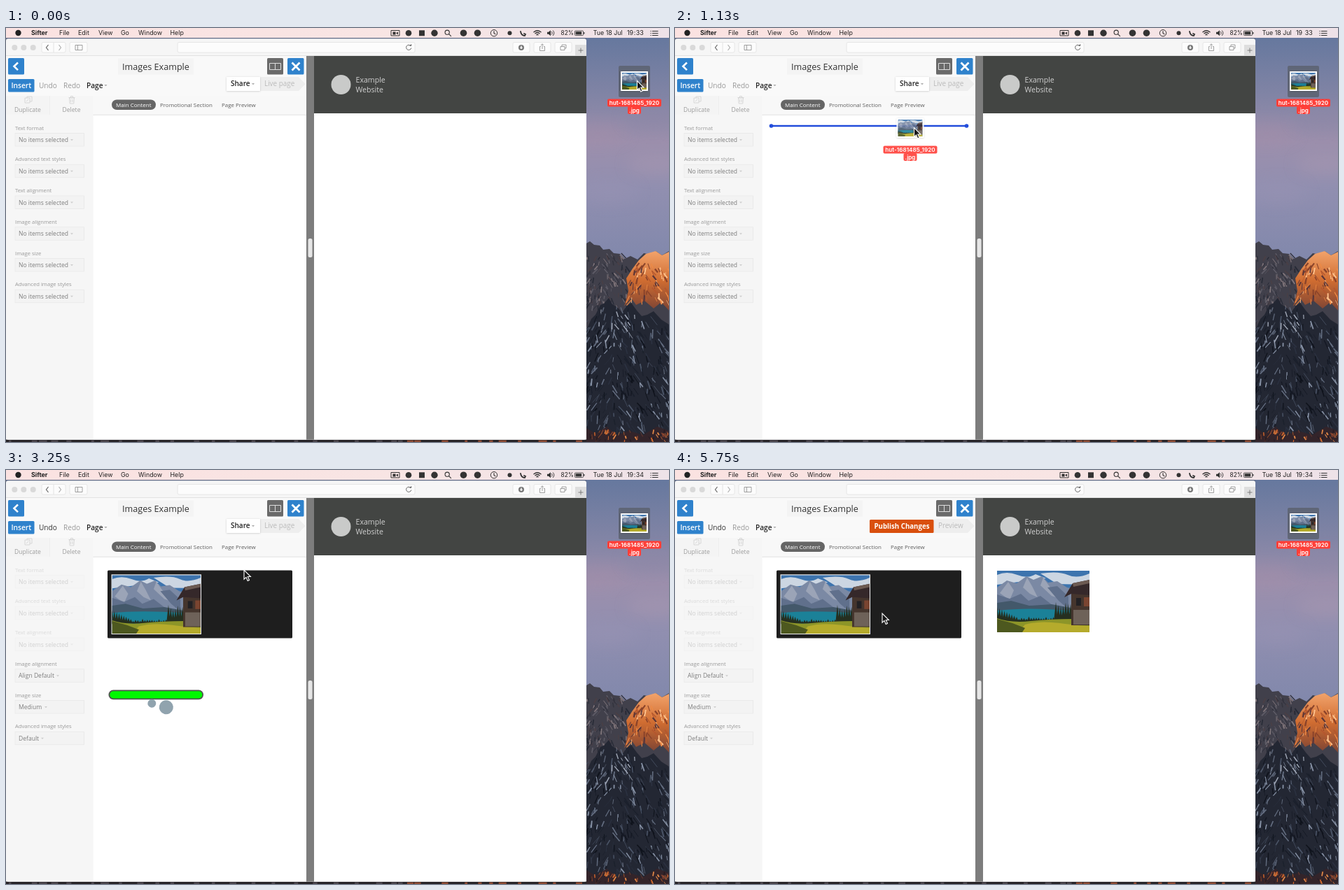
Animation, 947 px wide and 592 px high, one loop 7 s. Source, as an HTML page:

```html
<!DOCTYPE html>
<html lang="en">
<head>
<meta charset="utf-8">
<title>Drag an image into a page</title>
<style>
html, body { margin: 0; width: 100%; height: 100%; overflow: hidden; background: #fff; }
svg { display: block; width: 100vw; height: 100vh; }
text { font-family: "Open Sans", sans-serif; white-space: pre; }
.sys { font-family: Inter, sans-serif; }
</style>
</head>
<body>
<svg id="stage" viewBox="0 0 947 592" preserveAspectRatio="none"></svg>
<script>
let seed = 11;
const rnd = (a, b) => a + (b - a) * ((seed = seed * 16807 % 2147483647) / 2147483647);
const rect = (x, y, w, h, fill, more = '') =>
  `<rect x="${x}" y="${y}" width="${w}" height="${h}" fill="${fill}" ${more}/>`;
const dot = (x, y, r, fill, more = '') => `<circle cx="${x}" cy="${y}" r="${r}" fill="${fill}" ${more}/>`;
const path = (d, fill, more = '') => `<path d="${d}" fill="${fill}" ${more}/>`;
const line = (d, color, w = 1, more = '') => path(d, 'none', `stroke="${color}" stroke-width="${w}" ${more}`);
const text = (x, y, s, size, fill, more = '') =>
  `<text x="${x}" y="${y}" font-size="${size}" fill="${fill}" ${more}>${s}</text>`;
const sys = (x, y, s, more = '', size = 8.9) => text(x, y, s, size, '#222', 'class="sys" ' + more);
const group = (id, body, more = '') => `<g id="${id}" ${more}>${body}</g>`;
const caret = (x, y, color = '#aaa') => path(`M${x - 2} ${y - 1}h4l-2 2.2z`, color);
const mid = 'text-anchor="middle"', semi = 'font-weight="600"', bold = 'font-weight="700"';

function defs() {
  let trees = '';
  for (let x = 0; x < 106; x += 3.5) {
    const h = x < 30 ? 21 - x / 2 : x > 82 ? rnd(20, 30) : rnd(4, 8), y = 73;
    trees += `M${x - 3} ${y}L${x} ${(y - h).toFixed(1)}L${x + 3} ${y}z`;
  }
  const photo = rect(0, 0, 132, 88, '#3d74ae') +
    path('M0 6Q14 0 29 6T55 5L70 11 0 20zM62 4Q88 0 101 6T132 4V20L86 19z', '#ccd6e2') +
    path('M0 24L14 14 28 18 42 8 52 13 64 8 73 17 86 15 100 24 132 30V64H0z', '#7b89a4') +
    path('M4 32L16 16 24 28 18 42zM37 24L43 10 50 22 58 38 47 33zM62 21L66 10 76 24 90 40 78 36z', '#9ba4b7') +
    path('M0 34L18 40 34 33 45 43 62 36 84 53H0zM72 24L86 22 102 37V55L88 43z', '#60708c') +
    path('M0 46L20 43 46 50 78 48 105 53V74H0z', '#43586a') +
    path('M0 57Q44 52 104 57V74H20L0 68z', '#1b8198') +
    path(trees, '#252f20') +
    path('M0 68Q20 75 48 72T108 69L132 76V88H0z', '#8d9528') +
    path('M40 77Q60 71 90 75T132 79V88H30z', '#b5ab2c') +
    path('M0 69L22 75 40 82 36 88H0z', '#4d581f') +
    rect(106, 30, 26, 48, '#45352d') + rect(109, 56, 23, 21, '#6e6259') +
    rect(113, 39, 7, 11, '#222124') + rect(124, 38, 8, 13, '#7a4430') +
    path('M96 38L108 18 132 13V35L106 33z', '#35282a') + path('M108 18L132 13V18L109 23z', '#6c5a52');
  const label = rect(-38.5, 25.5, 77, 11, '#ff3f38', 'rx="2"') + rect(-9.5, 36, 19, 11, '#ff3f38', 'rx="2"') +
    text(0, 34.1, 'hut-1681485_1920', 8.15, '#fff', `class="sys" ${mid} ${semi}`) +
    text(0, 44.6, '.jpg', 8.15, '#fff', `class="sys" ${mid} ${semi}`);
  return `<defs>
    <linearGradient id="sky" x2="0" y2="1"><stop stop-color="#66789e"/><stop offset=".25" stop-color="#8184a5"/>
      <stop offset=".45" stop-color="#9c8fac"/><stop offset=".65" stop-color="#918fb0"/><stop offset="1" stop-color="#7f87ab"/></linearGradient>
    <linearGradient id="menu"><stop stop-color="#fbe2e1"/><stop offset=".6" stop-color="#f8e5e4"/><stop offset="1" stop-color="#eee2e8"/></linearGradient>
    <linearGradient id="lit" x2="0" y2="1"><stop stop-color="#f2a36b"/><stop offset=".5" stop-color="#cf6c31"/><stop offset="1" stop-color="#7d4434"/></linearGradient>
    <filter id="soft" x="-60%" y="-90%" width="220%" height="280%"><feGaussianBlur stdDeviation="10"/></filter>
    <filter id="shade" x="-20%" y="-20%" width="140%" height="150%"><feDropShadow dx="0" dy=".5" stdDeviation=".9" flood-opacity=".2"/></filter>
    <clipPath id="desk"><rect x="829" y="14" width="118" height="578"/></clipPath>
    <clipPath id="frame"><rect width="132" height="88"/></clipPath>
    ${group('photo', photo, 'clip-path="url(#frame)"')}
    ${group('file', rect(-19.5, -14, 39, 28, '#fff', 'filter="url(#shade)"') +
      '<use href="#photo" transform="translate(-17.5 -12) scale(.265 .273)"/>' + label)}
    ${group('badge', dot(9, 20.5, 8.6, '#2eb83b') + line('M9 15.5v10M4 20.5h10', '#fff', 2))}
    ${group('arrow', path('M0 0V13.2L3 10.4 5.2 15.5 7.5 14.5 5.3 9.5H9.4z', '#161616', 'stroke="#fff" stroke-width="1.1"'))}
  </defs>`;
}

function wallpaper() {
  let s = rect(829, 14, 118, 330, 'url(#sky)');
  for (const [x, y, c] of [[845, 150, '#a38da8'], [930, 195, '#a797b0'], [860, 235, '#9893b3'], [925, 130, '#8d87a6']])
    s += `<ellipse cx="${x}" cy="${y}" rx="42" ry="14" fill="${c}" opacity=".5" filter="url(#soft)"/>`;

  // short strokes that run down both sides of a ridge
  const scratch = (n, [x0, x1, y0, y1], ridge, colors, size, wide = 1.6) => {
    for (let i = 0; i < n; i++) {
      const x = rnd(x0, x1), y = rnd(y0, y1), h = rnd(.4, 1) * size, lean = (x < ridge ? -1 : 1) * rnd(-.2, 1) * h;
      s += line(`M${x.toFixed(1)} ${y.toFixed(1)}l${lean.toFixed(1)} ${h.toFixed(1)}`, colors[i % colors.length], rnd(.6, wide).toFixed(1));
    }
  };
  s += path('M829 308L834 305 840 310 848 311 853 317 862 316 868 322 877 323 884 330 892 326 902 331 911 322 921 324 928 319 937 325 947 319V592H829z', '#41404b');
  scratch(150, [829, 886, 322, 400], 850, ['#272a36', '#5c5a65', '#34343f', '#80757a', '#4a3f45'], 9, 2.2);
  s += path('M883 398L889 376 886 358 895 344 904 332 914 323 928 319 937 325 947 320V404L936 392 925 401 912 390 900 396 893 386z', 'url(#lit)');
  scratch(75, [890, 946, 334, 390], 914, ['#ffc08a', '#8a432a', '#ee8a45', '#56353a', '#b4572e'], 11, 2.4);
  s += path('M829 432L836 416 842 410 849 396 854 394 861 386 866 395 874 400 880 407 886 398 893 393 901 404 908 412 916 410 925 405 936 417 947 424V592H829z', '#232733');
  scratch(330, [829, 946, 412, 572], 866, ['#151924', '#4b5568', '#1b202c', '#8994a8', '#2b3140', '#0f131c', '#636d80'], 13, 1.9);
  scratch(40, [846, 900, 398, 440], 866, ['#a2a9b8', '#1b202c', '#5d6678'], 10);
  s += path('M829 572L842 580 858 570 873 582 890 576 910 582 930 570 947 576V592H829z', '#33242a');
  scratch(50, [832, 946, 574, 590], 880, ['#c8632c', '#241a20', '#8c4730', '#e58a48'], 7, 2);
  // a sliver of the desktop shows round the window
  let below = rect(0, 14, 829, 6, '#5f6a86') + rect(0, 584, 829, 8, '#262327');
  for (let x = 4; x < 829; x += rnd(9, 40))
    below += rect(x.toFixed(1), 589.5, rnd(3, 12).toFixed(1), 2.5, x > 560 ? '#8c4a33' : '#4a454c');
  return below + `<g clip-path="url(#desk)">${s}</g>`;
}

function menuBar() {
  let s = rect(0, 0, 947, 14, 'url(#menu)') + dot(17.5, 7, 4.2, '#222');
  [[36, 'Sifter', bold], [76, 'File'], [103, 'Edit'], [132, 'View'], [164, 'Go'], [189, 'Window'], [234.5, 'Help']]
    .forEach(([x, name, w]) => s += sys(x, 10.3, name, w));
  const ink = '#333', thin = (d, w = 1.1) => line(d, ink, w, 'stroke-linecap="round"');
  s += line('M550 3.5h12v7.5h-12z', ink) + path('M552.5 5.5h4v4h-4zM557 7.2l3-1.8v4.2z', ink);
  s += dot(575, 7.3, 4.3, ink) + rect(590, 3.3, 8, 8, ink) + dot(612, 7.2, 4.7, ink) + dot(653.5, 7.2, 4.8, ink) +
    dot(673.5, 7.2, 4.8, ink) + dot(719.5, 7.2, 3, ink);
  s += dot(630.2, 6.2, 3.1, 'none', `stroke="${ink}" stroke-width="1.1"`) + thin('M632.6 8.6l3 3');
  s += dot(697, 7.2, 4.7, 'none', `stroke="${ink}"`) + thin('M697 4.5v3l2 1.2');
  s += thin('M735 5q1 6 6 6l1-2-2-1', 1.8);
  s += thin('M754 5.7q5-4 10 0M756 7.8q3-2.5 6 0M758 9.8q1-1 2 0', 1.4);
  s += path('M773 5.8h2l3-2.5v8l-3-2.5h-2z', ink) + thin('M779.5 5.2q2 2 0 4M781.5 3.8q3 3.3 0 6.8', .9);
  s += sys(792.5, 10.2, '82%', '', 8.4) + rect(812.5, 4, 12, 6.6, 'none', `stroke="${ink}" stroke-width=".8" rx="1"`) +
    rect(813.7, 5.2, 8.5, 4.2, ink) + rect(825.2, 6, 1.2, 2.6, ink);
  s += sys(838.7, 10.3, 'Tue 18 Jul') + sys(887, 10.3, '19') + sys(896.8, 9.9, ':', 'id="colon"') + sys(899.8, 10.3, '33', 'id="minute"');
  for (let i = 0; i < 3; i++) s += rect(920.5, 4 + i * 3, 1.2, 1, ink) + rect(923, 4 + i * 3, 8.5, 1, ink);
  return s;
}

function browser() {
  let s = rect(0, 15.3, 829, 573.4, '#f6f6f6', 'rx="3"') + rect(0, 39.4, 829, .6, '#d5d5d5');
  [12.3, 25.3, 38.7].forEach(x => s += dot(x, 28, 4, '#d9d9d9'));
  const box = (x, w) => rect(x, 20.5, w, 14.5, '#fcfcfc', 'stroke="#e2e2e2" stroke-width=".8" rx="2"');
  s += box(51, 34) + box(91, 25) + box(245, 339) + box(724, 24) + box(754, 24) + box(784, 24) + line('M68 21v14', '#dedede', .8);
  s += line('M60.5 24l-3 4 3 4', '#666', 1.2) + line('M75.5 24l3 4-3 4', '#aaa', 1.1);
  s += line('M99 24.5h10v7h-10zM102.5 24.5v7', '#888', .8);
  s += line('M578 25.5a3.6 3.6 0 1 0 .8 3', '#666', 1) + path('M576 25.8h3.2v-3z', '#666');
  s += dot(736, 28, 4, '#777') + path('M735.3 25.5h1.4v2.3h1.6l-2.3 2.4-2.3-2.4h1.6z', '#fff');
  s += line('M764 26.5h-1.5v6h7v-6h-1.5M766 30v-7M764 24.7l2-2 2 2', '#888', .8);
  s += line('M792 26.5h6v5h-6zM794 26v-2h6v5h-2', '#888', .8);
  s += rect(813, 24, 16, 16, '#dedede') + line('M821 28.5v7M817.5 32h7', '#666', .8);
  // right-hand page
  s += rect(440, 40, 389, 548.5, '#fff') + rect(440, 40, 389, 82, '#434543');
  s += dot(478.5, 81, 14, '#c9cac9') + text(499.5, 78, 'Example', 10.6, '#d0d0d0') + text(499.5, 92.2, 'Website', 10.6, '#d0d0d0');
  s += group('result', '<use href="#photo" transform="translate(460 144)"/>');
  return s;
}

function sidebar() {
  const names = ['Text format', 'Advanced text styles', 'Text alignment', 'Image alignment', 'Image size', 'Advanced image styles'];
  const picked = [, , , ['Align Default', 74], ['Medium', 57], ['Default', 52]];
  const select = (y, s, x) => text(18, y + 163, s, 8.55, '#7d7d7d') + caret(x, y + 160, '#cdcdcd');
  let s = rect(0, 97, 124.5, 491.5, '#f6f6f6') + rect(0, 97, 62, 27, '#f4f4f4') + line('M62.5 97v27', '#eee');
  s += line('M27 100h7v7h-7zM30 100v-2h7v7h-3M29 105l3-3', '#d4d4d4', .9);
  s += line('M90.5 100h7l-.7 8h-5.6zM89.5 99.5h9M92.5 99v-1.5h3V99M92.7 102v4M95.3 102v4', '#d4d4d4', .9);
  s += text(31, 120, 'Duplicate', 8.6, '#9c9c9c', mid) + text(93.5, 120, 'Delete', 8.6, '#9c9c9c', mid);
  names.forEach((name, i) => {
    const y = i * 44.75;
    let row = text(13, y + 145.7, name, 7.65, '#999') +
      rect(13, y + 150.5, 98.5, 18.5, '#f3f3f3', 'stroke="#e8e8e8" stroke-width=".8"') +
      `<g class="idle">${select(y, 'No items selected', 94)}</g>`;
    if (picked[i]) row += `<g class="picked">${select(y, ...picked[i])}</g>`;
    s += `<g class="${i < 3 ? 'textRow' : ''}">${row}</g>`;
  });
  return s;
}

function editor() {
  const blue = '#2f82cc', tag = 'M363 70H418L427.5 80 418 90H363z';
  let s = rect(0, 40, 429, 84, '#f9f9f9') + rect(124.5, 124, 304.5, 464.5, '#fff');
  s += rect(124.5, 97, 304.5, 27, '#f8f8f8') + sidebar() + line('M124.5 124.3H429', '#e0e0e0', .9);
  s += rect(3, 43, 23, 23.5, blue, 'rx="1.5"') + line('M17 49.5l-5.5 5.3 5.5 5.3', '#fff', 2.6);
  s += rect(160, 43.5, 108, 23, '#f4f4f4') + text(214, 59.7, 'Images Example', 12.6, '#333', mid);
  s += rect(373, 43, 23, 23.5, '#6a6a6a', 'rx="1.5"') + line('M376.5 50.5h16v9h-16zM384.5 50v10', '#ddd', 1);
  s += rect(402, 43, 23.5, 23.5, blue, 'rx="1.5"') + line('M408.5 49.5l11 11M419.5 49.5l-11 11', '#fff', 2.8);
  s += rect(3, 73, 37.5, 18.5, blue, 'rx="1.5"') + text(21.8, 86, 'Insert', 10.2, '#fff', `${mid} ${semi}`);
  s += text(47, 86, 'Undo', 10.1, '#999', 'id="undo"') + text(82, 86, 'Redo', 10.1, '#999') +
    text(115, 86, 'Page', 10.1, '#222', semi) + caret(142.5, 82);
  s += group('share', path(tag, '#eee') + rect(315, 70, 48, 20, '#fff', 'filter="url(#shade)"') +
    text(321, 83.3, 'Share', 10, '#222', semi) + caret(353, 80) + text(369, 83.3, 'Live page', 9.9, '#bbb'));
  s += group('publish', path(tag, '#eee') + rect(278, 71, 91.5, 19, '#d94f0d', 'rx="1.5"') +
    text(324, 83.6, 'Publish Changes', 9.7, '#fff', `${mid} ${bold}`) + text(376, 83.3, 'Preview', 9.9, '#bbb'));
  s += rect(151, 102.5, 63, 14.5, '#656565', 'rx="7.2"') + text(182.3, 112.5, 'Main Content', 8, '#fff', mid) +
    text(220, 112.5, 'Promotional Section', 7.95, '#5c5c5c') + text(308, 112.5, 'Page Preview', 7.95, '#5c5c5c');
  s += group('target', line('M137.5 140H416.5', '#234ddb', 2.4) + dot(137.5, 140, 2.8, '#234ddb') + dot(416.5, 140, 2.8, '#234ddb'));
  s += group('block', rect(145, 143.5, 264, 97, '#1e1e1e', 'rx="1.5"') + rect(150.5, 149.3, 128.5, 85.7, '#eee') +
    '<use href="#photo" transform="translate(151.5 150.3) scale(.958 .952)"/>');
  s += group('upload', rect(146.5, 314.5, 135.5, 13.7, '#515151', 'rx="6.8"') +
    rect(148.3, 316.3, 0, 10.1, '#00f800', 'rx="5" id="bar"') +
    group('spin', dot(16, -10.6, 0, '#90a3ae', 'id="ballA"') + dot(16, 10.6, 0, '#90a3ae', 'id="ballB"')));
  s += rect(429, 40, 11, 548.5, '#7d7d7d') + rect(431.5, 301, 6, 27, '#e6e6e6', 'rx="2.5"');
  return s;
}

const stage = document.getElementById('stage');
stage.innerHTML = defs() + wallpaper() + browser() + editor() + menuBar() +
  rect(875, 54, 45, 45, '#5c6270', 'rx="2" opacity=".85"') + '<use href="#file" x="897.5" y="76"/>' +
  group('ghostDrag', '<use href="#file"/><use href="#badge"/>', 'opacity=".2"') +
  group('drag', '<use href="#file" opacity=".9"/>' + group('plus', '<use href="#badge"/>')) +
  '<use id="trail" href="#arrow" opacity=".5"/><use id="cursor" href="#arrow"/>';

const $ = id => document.getElementById(id);
const all = (sel, fn) => stage.querySelectorAll(sel).forEach(fn);
const show = (el, on) => el.style.display = on ? '' : 'none';
const move = (el, x, y) => el.setAttribute('transform', `translate(${x} ${y})`);
const at = (pts, i) => pts[Math.max(0, Math.min(i, pts.length - 1))];
const swell = p => 16 * (1 - Math.cos(2 * Math.PI * p)) / 2;

const LOOP = 7000, STEP = 125;
const dragPath = [[897, 76], [878, 84], [803, 112], [695, 151], [583, 181], [485, 193], [385, 162], [350, 148], [338, 144], [336, 143]];
const leavePath = [[340, 143], [340, 148], [331, 176], [315, 195], [303, 202], [297, 205], [296, 205]];

function draw(time) {
  const k = Math.floor(time / STEP), t = k * STEP;
  const dragging = k > 0 && t < 1625, added = t >= 3125, sent = t >= 4250;

  const [x, y] = at(dragPath, k), dx = at(dragPath, k + 1)[0] - x;
  move($('drag'), x, y);
  move($('ghostDrag'), x + dx * .16, y);
  show($('drag'), dragging);
  show($('ghostDrag'), dragging && dx < -30);
  show($('plus'), k > 2 && k < 8);
  show($('target'), dragging && t >= 750);

  const leg = k - 30, [cx, cy] = at(leavePath, leg), [px, py] = at(leavePath, leg - 1);
  if (t < 1625) move($('cursor'), x + 5.5 - .055 * Math.abs(dx), y - .5);
  else move($('cursor'), cx, cy - (added ? 0 : 1));
  move($('trail'), cx + (px - cx) / 2, cy + (py - cy) / 2);
  show($('trail'), leg > 1 && leg < 5);

  // the upload spinner turns once in two seconds
  const run = t - 1668, p = run / 2000;
  show($('upload'), run > 0 && t < 4625);
  $('bar').setAttribute('width', 132 * Math.max(0, Math.min(1, (t - 2500) / 500)));
  $('spin').setAttribute('transform', `translate(214.5 352) rotate(${p * 360})`);
  $('ballA').setAttribute('r', swell(p));
  $('ballB').setAttribute('r', swell(p + .5));

  show($('block'), added);
  $('undo').setAttribute('fill', added ? '#333' : '#999');
  all('.textRow', el => el.setAttribute('opacity', added ? .3 : 1));
  all('.picked', el => show(el, added));
  all('g:not(.textRow) > .idle', el => show(el, !added));
  show($('share'), !sent);
  show($('publish'), sent);
  show($('result'), t >= 5625);
  $('result').setAttribute('opacity', t < 5750 ? .5 : 1);

  show($('colon'), Math.floor((Math.min(t, 6000) + 750) / 1000) % 2 === 0);
  $('minute').textContent = t < 2250 ? '33' : '34';
}

function tick() {
  draw(performance.now() % LOOP);
  requestAnimationFrame(tick);
}
tick();
</script>
</body>
</html>
```
